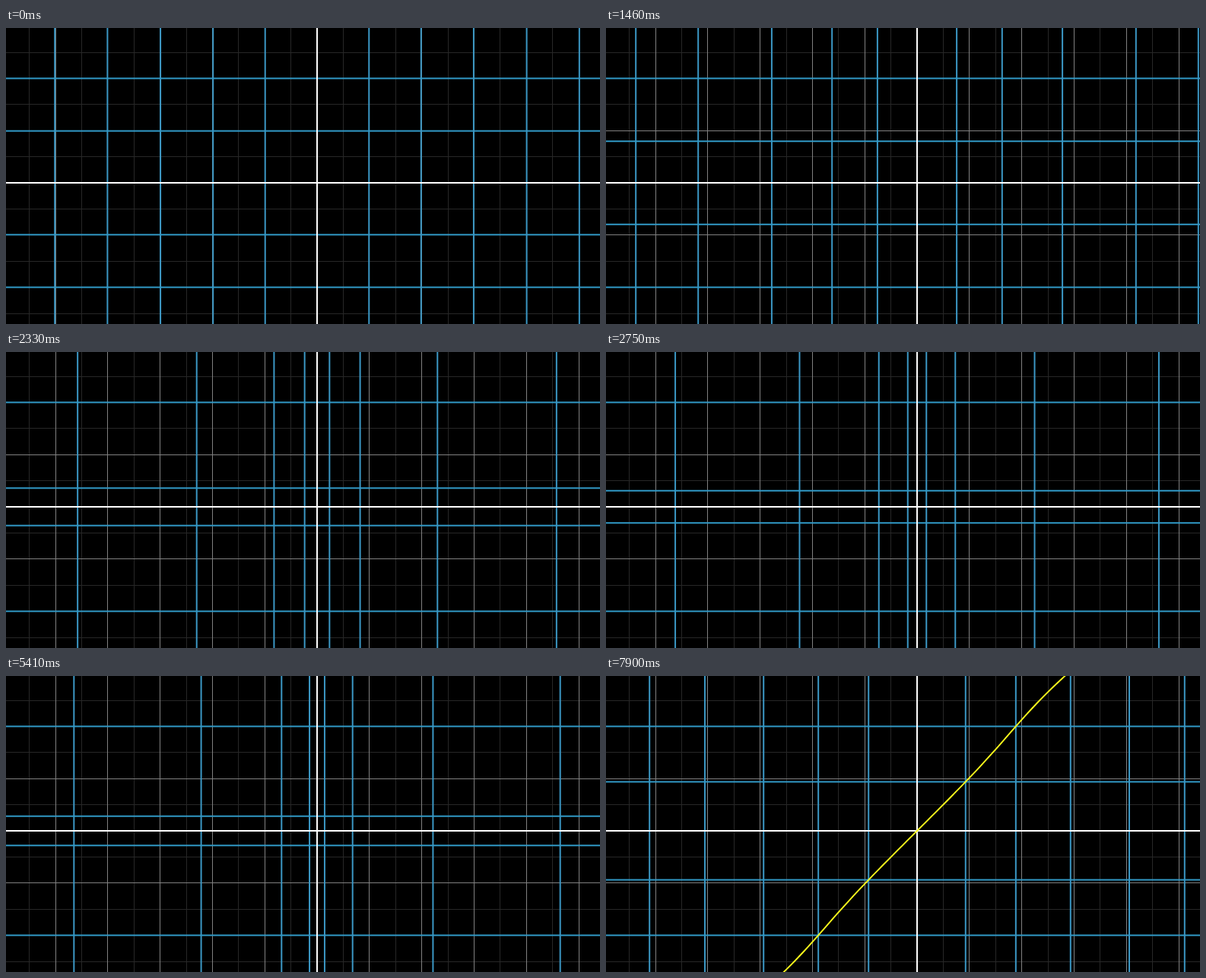
Write an HTML page with a canvas that moves like this. It is 781x390 px and loops after 8 s.

```html
<!DOCTYPE html>
<html lang="en">
<head>
<meta charset="utf-8">
<title>Nonlinear grid transformation</title>
<style>
  html, body { margin: 0; width: 100%; height: 100%; overflow: hidden; background: #000; }
  canvas { display: block; }
</style>
</head>
<body>
<canvas id="stage" width="781" height="390"></canvas>
<script>
const W = 781, H = 390, LOOP = 8000;
const UNIT = 68.8, CX = 409, CY = 204;
const HALF_W = 64 / 9, HALF_H = 4;
const WARP_TIME = 2950, WARP_1 = 250, WARP_2 = 7104;
const CUT = 6050, DRAW_TIME = 1000;
const ctx = document.getElementById('stage').getContext('2d');

// Runs of picture changes: first, last, count
const RUNS = [
  [250, 1180, 8], [1310, 2330, 8], [2480, 3490, 8], [3610, 4570, 8],
  [4720, 5700, 8], [5850, 6780, 8], [7350, 7900, 5]
];

const clamp = v => Math.min(1, Math.max(0, v));
const sigmoid = v => 1 / (1 + Math.exp(-v));

function smooth(t) {
  const edge = sigmoid(-5);
  return clamp((sigmoid(10 * (clamp(t) - 0.5)) - edge) / (1 - 2 * edge));
}

const squeeze = (v, half) => Math.sign(v) * half * smooth(Math.abs(v) / half);
const mix = (a, b, p) => a + (b - a) * p;
const warpX = (x, p) => CX + UNIT * mix(x, squeeze(x, HALF_W), p);
const warpY = (y, p) => CY - UNIT * mix(y, squeeze(y, HALF_H), p);

// Hold each picture until the next step
function hold(t) {
  let held = 0;
  for (const [first, last, count] of RUNS) {
    if (t < first) break;
    const gap = (last - first) / (count - 1);
    held = first + gap * Math.min(count - 1, Math.floor((t - first) / gap + 1e-6));
  }
  return held;
}

function vertical(x, color, width) {
  ctx.fillStyle = color;
  ctx.fillRect(x - width / 2, 0, width, H);
}

function horizontal(y, color, width) {
  ctx.fillStyle = color;
  ctx.fillRect(0, y - width / 2, W, width);
}

function backGrid(offset, color) {
  const crisp = v => Math.floor(v) + 0.5;
  for (let i = -6; i <= 6; i++) {
    vertical(crisp(CX + (i + offset) * UNIT), color, 1);
    horizontal(crisp(CY + (i + offset) * UNIT), color, 1);
  }
}

function warpedGrid(p) {
  for (let i = -7; i <= 7; i++) {
    if (i === 0) continue;
    vertical(warpX(i, p), '#3b97c4', 2);
    if (Math.abs(i) < 4) horizontal(warpY(i, p), '#3199c6', 2);
  }
}

function diagonal(p, shown) {
  if (shown <= 0) return;
  const steps = 80, end = -4 + 8 * shown;
  ctx.beginPath();
  for (let i = 0; i <= steps; i++) {
    const v = mix(-4, end, i / steps);
    ctx.lineTo(warpX(v, p), warpY(v, p));
  }
  ctx.strokeStyle = '#fcfc1c';
  ctx.lineWidth = 1.9;
  ctx.lineJoin = 'round';
  ctx.stroke();
}

function draw(t) {
  const second = t >= CUT;
  const start = second ? WARP_2 : WARP_1;
  const p = Math.max(second ? 0 : 0.009, smooth((t - start) / WARP_TIME));
  ctx.fillStyle = '#000';
  ctx.fillRect(0, 0, W, H);
  backGrid(0.5, '#272727');
  backGrid(0, '#808080');
  warpedGrid(p);
  vertical(CX, '#fff', 2);
  horizontal(CY, '#fff', 2);
  if (second) diagonal(p, smooth((t - CUT) / DRAW_TIME));
}

const begin = performance.now();
function tick() {
  draw(hold((performance.now() - begin) % LOOP));
  requestAnimationFrame(tick);
}
tick();
</script>
</body>
</html>
```
